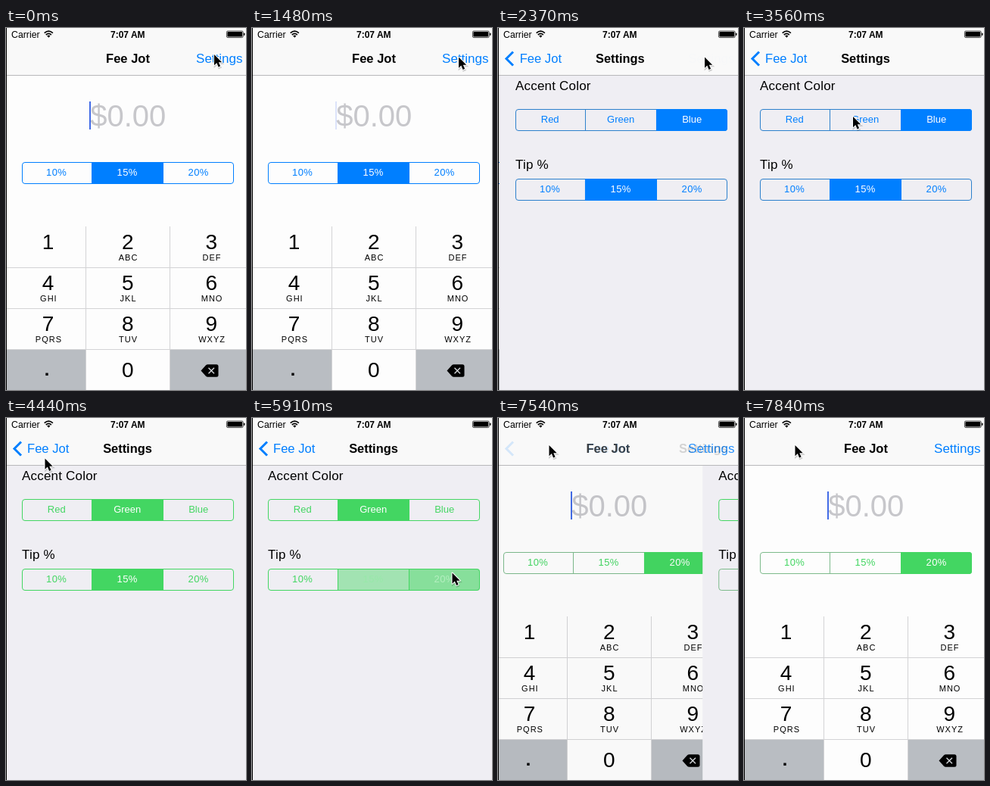
An HTML page for the animation above (7.99 s loop, 317 px wide and 478 px high).

```html
<!DOCTYPE html>
<html lang="en">
<head>
<meta charset="utf-8">
<title>Tip calculator demo</title>
<style>
  html, body { margin: 0; width: 100%; height: 100%; overflow: hidden; background: #fdfdfd; }
  svg { display: block; width: 100vw; height: 100vh; font-family: "Liberation Sans", Arial, sans-serif; }
</style>
</head>
<body>
<svg id="stage" viewBox="0 0 317 478" preserveAspectRatio="none"></svg>
<script>
const stage = document.getElementById('stage');
const LOOP = 7990, STEP = 147.8, LAST = 53;
const APP = 'Fee Jot';
const BLUE = '#007fff', GREEN = '#43d662';
const TIPS = ['10%', '15%', '20%'], COLORS = ['Red', 'Green', 'Blue'];

// Pointer tip: step, x, y
const PATH = [
  [0, 275, 35], [1, 273, 38.5], [16, 273, 38.5], [17, 258, 47], [18, 205, 72], [19, 135, 90],
  [20, 92, 96], [22, 128, 111], [24, 144, 117], [28, 144, 117], [29, 88, 80], [30, 51.5, 53.5],
  [32, 41, 44], [34, 41, 44], [35, 70, 75], [36, 160, 148], [37, 245, 196], [38, 264.5, 204.5],
  [41, 264.5, 204.5], [43, 225, 160], [44, 150, 100], [45, 95, 60], [47, 67.5, 36]
];

function pointerAt(k) {
  const i = PATH.findIndex(p => p[0] > k);
  if (i < 0) return PATH[PATH.length - 1].slice(1);
  const [k0, x0, y0] = PATH[i - 1], [k1, x1, y1] = PATH[i];
  const f = (k - k0) / (k1 - k0);
  return [x0 + (x1 - x0) * f, y0 + (y1 - y0) * f];
}

// Remaining distance of a critically damped spring
function rest(ms) {
  const u = Math.max(0, ms) / 1000 * 18.3;
  return (1 + u) * Math.exp(-u);
}

// 0 = main screen, 1 = settings screen
function progressAt(k) {
  const t = k * 147.95;
  if (k >= LAST || k < 14) return 0;
  if (k >= 50) return rest(t - 7360);
  return k > 16 ? 1 : 1 - rest(t - 1975);
}

function caretAt(k) {
  if (k < 3 || k >= 50) return 1;
  if (k === 3 || k === 10) return 0.18;
  if (k === 6) return 0.5;
  return k > 6 && k < 10 ? 1 : 0;
}

function text(s, x, y, size, fill = '#000', extra = '') {
  return `<text x="${x}" y="${y}" font-size="${size}" fill="${fill}" ${extra}>${s}</text>`;
}
const MID = 'text-anchor="middle"';
const rect = (x, y, w, h, fill, extra = '') =>
  `<rect x="${x}" y="${y}" width="${w}" height="${h}" fill="${fill}" ${extra}/>`;

// on: how strongly each of the three parts is selected, 0 to 1
function segments(y, labels, on, tint, edge = tint) {
  const left = [0, 92, 186], width = [93, 95, 94], center = [45.7, 139.2, 233.2];
  const fills = on.map((a, i) => a ? rect(left[i], 0, width[i], 29, tint, `fill-opacity="${a}"`) : '').join('');
  const names = labels.map((s, i) =>
    text(s, center[i], 18, 13, `color-mix(in srgb, #fff ${on[i] * 100}%, ${tint})`,
      MID + (s.endsWith('%') ? ' letter-spacing=".4"' : ''))).join('');
  const full = on.indexOf(1);
  const solid = full < 0 ? '' : rect(left[full], 0, width[full], 29, tint);
  return `<g transform="translate(21 ${y})"><g clip-path="url(#pill)">${fills}</g>
    <g fill="none" stroke="${edge}"><rect x=".5" y=".5" width="279" height="28" rx="3.5"/>
    <path d="M92.5 0V29M186.5 0V29"/></g><g clip-path="url(#pill)">${solid}</g>${names}</g>`;
}

function keypad() {
  const letters = ['', 'ABC', 'DEF', 'GHI', 'JKL', 'MNO', 'PQRS', 'TUV', 'WXYZ'];
  const cols = [55.5, 160.7, 271.2];
  let s = rect(0, 425, 105, 53, '#b9bdc2') + rect(217, 425, 102, 53, '#b9bdc2');
  s += '<path d="M105.5 262V478M216.5 262V478M0 316.5H319M0 370.5H319M0 424.5H319" stroke="#d3d3d5"/>';
  letters.forEach((name, i) => {
    const x = cols[i % 3], y = 292 + 54 * Math.floor(i / 3);
    s += text(i + 1, x, y, 28, '#000', MID);
    s += text(name, x + 0.9, y + 15, 11, '#000', MID + ' letter-spacing="1"');
  });
  s += text('0', cols[1], 461, 28, '#000', MID) + rect(52.3, 455.5, 3.4, 3.4, '#000');
  s += `<path d="M257.5 452.5L264 445.3Q265 444.3 266.5 444.3H278Q280.5 444.3 280.5 446.8V458.2Q280.5 460.7 278 460.7H266.5Q265 460.7 264 459.7Z"/>
    <path d="M267.5 448.7L275 456.2M275 448.7L267.5 456.2" stroke="#d4d7da" stroke-width="1.4"/>`;
  return s;
}

function mainScreen(k, p) {
  const late = k >= 40;
  return `<g transform="translate(${-95 * p} 0)">` +
    rect(0, 63, 318, 415, '#fdfdfd') +
    text('$0.00', 111.2, 130, 40, '#c7c7cb') +
    rect(110, 97, 2, 37, '#426be6', `opacity="${caretAt(k)}"`) +
    (late ? segments(177, TIPS, [0, 0, 1], GREEN, '#7dba8b') : segments(177, TIPS, [0, 1, 0], BLUE)) +
    keypad() + '</g>' + rect(0, 63, 317, 415, '#000', `opacity="${0.1 * p}"`);
}

function settingsScreen(k, p) {
  if (!p) return '';
  const tint = k < 26 ? BLUE : GREEN;
  const color = k < 26 ? [0, 0, 1] : k === 26 ? [0, 0.6, 0.45] : [0, 1, 0];
  const tip = k < 40 ? [0, 1, 0] : k === 40 ? [0, 0.45, 0.6] : [0, 0, 1];
  const edge = k < 26 ? '#2c80cc' : tint;
  return `<g transform="translate(${317 * (1 - p)} 0)">` +
    rect(0, 63, 318, 415, '#efeef3') +
    text('Accent Color', 21, 82, 17, '#000', 'letter-spacing=".2"') +
    segments(107, COLORS, color, tint, edge) +
    text('Tip %', 21, 186, 17, '#000', 'letter-spacing=".2"') +
    segments(199, TIPS, tip, tint, k > 40 ? '#7dba8b' : edge) + '</g>';
}

function navBar(k, p) {
  const pressed = k === 13 ? 0.25 : 1;
  const fade = a => `opacity="${a}"`;
  const bold = 'font-weight="700" ' + MID;
  return rect(0, 0, 317, 62, '#f9f9f9') + rect(0, 62, 317, 1, '#b8b8ba') +
    text(APP, 161 - 106 * p, 46, 16.5, '#000', bold + fade(Math.max(0, 1 - 1.6 * p))) +
    text('Settings', 312.5, 46, 17, BLUE, 'text-anchor="end" ' + fade((1 - p) * pressed)) +
    text('Settings', 160.5 + 130 * (1 - p), 46, 16.4, '#000', bold + fade(p)) +
    text(APP, 28 + 106 * (1 - p), 46, 16.6, BLUE, fade(p)) +
    `<path d="M20 31.5L11 40.5L20 49.5" fill="none" stroke="${BLUE}" stroke-width="3" ${fade(p)}/>`;
}

function statusBar() {
  return text('Carrier', 7, 12.6, 12.3) +
    text('7:07 AM', 160.8, 12.6, 12, '#000', 'font-weight="700" ' + MID) +
    `<g fill="none" stroke="#000" stroke-width="1.7"><path d="M50.7 6.6Q56.3 1.6 61.9 6.6M52.8 9Q56.3 5.9 59.8 9"/></g>
    <path d="M54.2 10.4Q56.3 8.6 58.4 10.4L56.3 12.7Z"/>
    <rect x="291.4" y="4" width="21.8" height="8.6" rx="1.6" fill="none" stroke="#000" stroke-width=".7"/>` +
    rect(292.4, 5, 19.8, 6.6, '#000', 'rx=".8"') + rect(314, 6.6, 1.4, 3.4, '#000', 'rx=".7"');
}

function pointer(k) {
  const [x, y] = pointerAt(k);
  const d = 'M0 0V14.2L3.3 11.1L5.6 16.4L8.1 15.3L5.8 10.2H10.2Z';
  return `<g transform="translate(${x} ${y})">
    <path d="${d}" transform="translate(.6 1.6)" fill="#000" stroke="#000" stroke-width="2" opacity=".18"/>
    <path d="${d}" fill="#000" stroke="#fff" stroke-width="2" stroke-linejoin="round" paint-order="stroke"/></g>`;
}

const DEFS = '<defs><clipPath id="pill"><rect width="280" height="29" rx="4"/></clipPath></defs>';
let shown = -1;

function draw(k) {
  if (k === shown) return;
  shown = k;
  const p = progressAt(k);
  stage.innerHTML = DEFS + mainScreen(k, p) + settingsScreen(k, p) + navBar(k, p) +
    statusBar() + rect(0, 0, 1, 478, '#000') + pointer(k);
}

const start = performance.now();
function tick() {
  const t = (performance.now() - start) % LOOP;
  draw(Math.min(LAST, Math.floor(t / STEP + 0.06)));
  requestAnimationFrame(tick);
}
tick();
</script>
</body>
</html>
```
